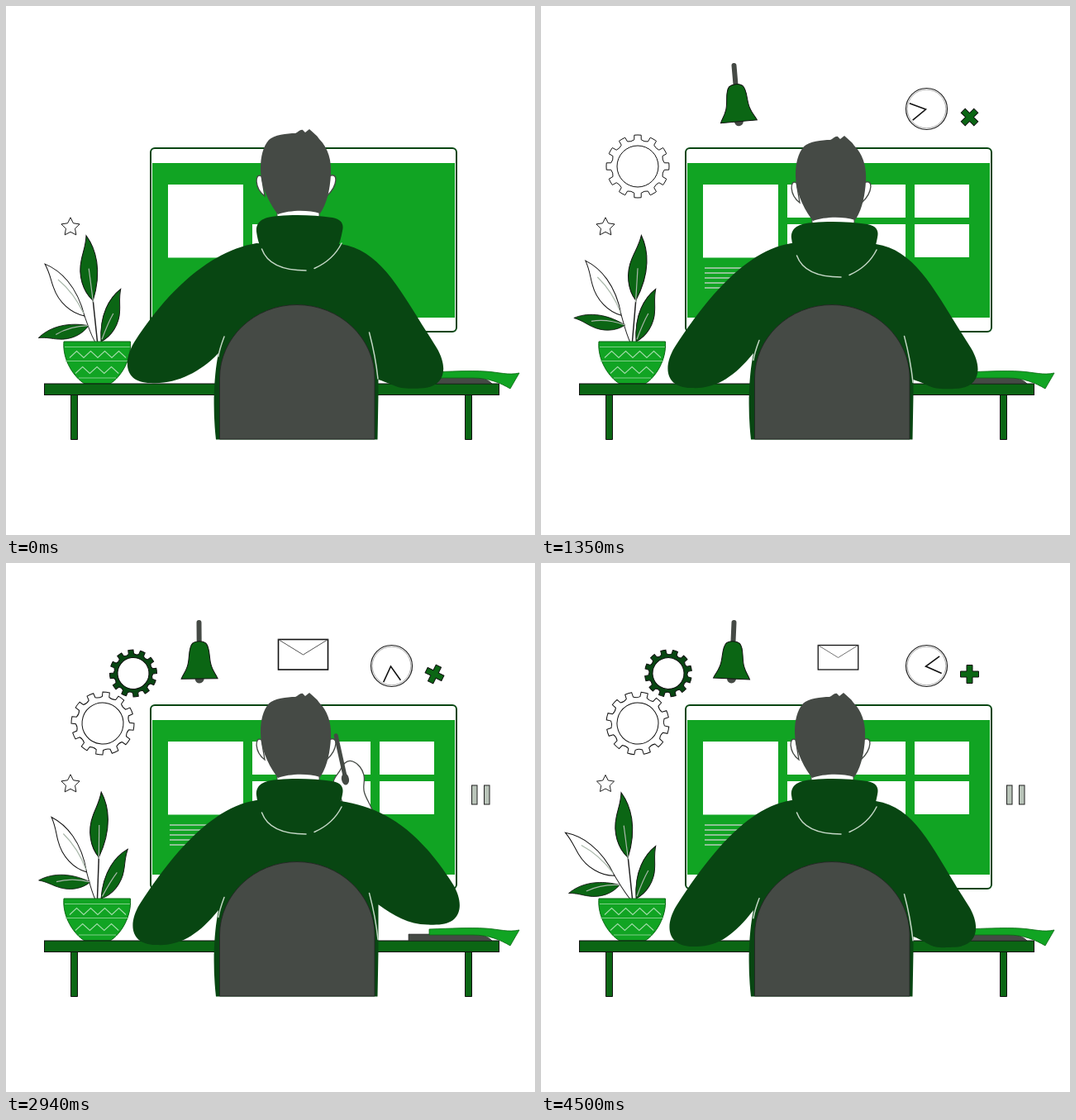
An HTML page for the animation above (4.53 s loop, 640 by 640 pixels).

```html
<!DOCTYPE html>
<html lang="en">
<head>
<meta charset="utf-8">
<title>Working at the desk</title>
<style>
html, body { margin: 0; width: 100%; height: 100%; overflow: hidden; background: #fff; }
svg { display: block; width: 100vw; height: 100vh; }
.green { fill: #11a423; }
.leaf { fill: #0b6614; }
.dark { fill: #084612; }
.grey { fill: #454a45; }
.white { fill: #fff; }
.edge { stroke: #111; stroke-width: 1; }
.bold { stroke: #111; stroke-width: 1.6; }
.line { fill: none; stroke: #c3d6c5; stroke-width: 1.5; stroke-linecap: round; }
.vein { fill: none; stroke: #a9b8aa; stroke-width: 1.2; }
</style>
</head>
<body>
<svg viewBox="0 0 640 640" xmlns="http://www.w3.org/2000/svg">
  <rect x="175" y="172" width="370" height="222" rx="5" fill="#fff" stroke="#084612" stroke-width="2"/>
  <rect class="green" x="177" y="190" width="366" height="187"/>
  <rect class="white" x="196" y="216" width="91" height="88.5"/>
  <g id="panels" class="white"></g>
  <g id="text" stroke="#b9cdbb" stroke-width="1.7"></g>

  <path id="star" class="white edge"/>
  <g id="clock">
    <circle r="25" fill="#fff" stroke="#222" stroke-width="1.2"/>
    <circle r="23.3" fill="none" stroke="#777" stroke-width=".6"/>
    <path id="hands" d="M0 -21V0L-17.8 -10.3" fill="none" stroke="#111" stroke-width="1.6"/>
  </g>
  <path id="cross" class="leaf edge" d="M-3.5 -11H3.5V-3.5H11V3.5H3.5V11H-3.5V3.5H-11V-3.5H-3.5Z"/>
  <g id="bigGear"><path id="bigTeeth" class="white edge"/><circle class="white edge" r="25"/></g>
  <g id="smallGear"><path id="smallTeeth" class="dark edge"/><circle class="white edge" r="19"/></g>
  <g id="bell">
    <path d="M0 0V28" stroke="#454a45" stroke-width="6" stroke-linecap="round"/>
    <circle class="grey" cy="68" r="5.5"/>
    <path class="leaf edge" d="M-8 25C-4 22 4 22 8 25C14 31 11 45 15 54C17 60 20 63 22 68H-22C-20 63 -17 60 -15 54C-11 45 -14 31 -8 25Z"/>
  </g>
  <g id="mail">
    <rect class="white bold" x="-30" y="-36.5" width="60" height="36.5"/>
    <path d="M-30 -36.5L0 -18L30 -36.5" fill="none" stroke="#555"/>
  </g>
  <g id="pause" fill="#b9c4b9" stroke="#222">
    <rect x="-11" y="-11.5" width="6.5" height="23"/>
    <rect x="4" y="-11.5" width="6.5" height="23"/>
  </g>

  <g id="paleLeaf">
    <path d="M95 375C99 386 102 396 108 407" fill="none" stroke="#222"/>
    <path class="blade white edge" transform="translate(95 375) rotate(-37.3)"/>
    <path class="vein" d="M63 331C75 341 86 355 94 372" stroke-width=".8"/>
  </g>
  <g id="tallLeaf">
    <path d="M0 -51V0" fill="none" stroke="#222" stroke-width="1.5"/>
    <path class="blade leaf edge" transform="translate(0 -50)"/>
    <path class="vein" d="M-1 -89L0 -48"/>
  </g>
  <g id="lowLeaf">
    <path class="blade leaf edge" transform="scale(.8 .79)"/>
    <path class="vein" d="M-1 -41C3 -28 3 -14 0 0"/>
  </g>
  <g id="rightLeaf">
    <path class="blade leaf edge" transform="scale(-.9 .86)"/>
    <path class="vein" d="M2 -37C0 -25 0 -14 0 -3"/>
  </g>
  <path class="green" d="M70 406H150.5C152 428 139 449 126 457H95C82 449 68 428 70 406Z" stroke="#0b6614"/>
  <path d="M71 412.5H150M72 429.5H148M88 450H133" fill="none" stroke="#7fcf88"/>
  <path id="zigzag" fill="none" stroke="#a3dcaa" stroke-width="1.1"/>

  <rect class="leaf edge" x="46.5" y="457" width="550" height="13.5"/>
  <path class="leaf edge" d="M78.5 470.5H86.5V524.5H78.5ZM555.5 470.5H563.5V524.5H555.5Z"/>
  <path class="grey" d="M487 449H565C575 449 584 452 588 457H487Z" stroke="#222" stroke-width=".6"/>
  <path class="green" d="M512 443C540 442 560 441 580 442C596 443 608 447 621 444L610 463C598 456 584 450 565 450H512Z" stroke="#0b6614" stroke-width=".8"/>

  <g id="hand">
    <path class="white" stroke="#454a45" stroke-width="1.3" d="M403 271C404 265 410 262 414 257C418 251 424 246 430 249C437 253 441 261 441 269C441 277 437 281 438 289C439 298 443 304 444 314L410 316C412 298 407 280 403 271Z"/>
    <path d="M416 215L418.500 270" stroke="#454a45" stroke-width="5" stroke-linecap="round"/>
    <ellipse class="grey" cx="418" cy="269" rx="4.5" ry="7"/>
  </g>
  <path id="body" class="dark"/>
  <g id="head">
    <path class="white" d="M328 250V270H379V250" stroke="#454a45"/>
    <path class="white" stroke="#454a45" stroke-width="1.3" d="M309 214C301 209 300 228 313 238ZM391 214C402 208 402 225 388 238Z"/>
    <path class="grey" d="M318 170C324 164 340 162 350 162C353 161 356 157 359 158L362 161L367 157C371 161 376 164 379 169C390 180 394 195 393 212C392 230 388 248 380 259C365 254 342 255 329 260C318 246 308 225 308 205C308 190 311 178 318 170Z"/>
  </g>
  <g id="hood">
    <path class="dark" d="M303 281C302 268 312 263 330 262C350 260 375 261 395 264C406 266 409 272 407 280C404 296 400 306 390 314C370 330 335 330 318 315C308 303 305 295 303 281Z"/>
    <path class="line" d="M309.5 302C316 320 335 328 363 328M373 325.5C390 318 400 307 406 295"/>
  </g>
  <path class="grey" d="M258.5 524V450C258.5 402 300 361.5 352 361.5C404 361.5 446 402 446 450V524Z" stroke="#222" stroke-width=".8"/>
  <path id="folds" class="line" d="M264 408C261 416 258 424 257 432M439.5 403C444 420 448 440 450 459"/>
</svg>
<script>
const LOOP = 4530, STEP = 30;
const $ = id => document.getElementById(id);
const move = (id, value) => $(id).setAttribute('transform', value);
const shape = (id, d) => $(id).setAttribute('d', d);
const clamp = v => Math.max(0, Math.min(1, v));
const ease = p => (1 - Math.cos(Math.PI * clamp(p))) / 2;
const mix = (a, b, p) => a + (b - a) * p;
const pop = (t, start, span = 240) => ease((t - start) / span);
const bump = (t, from, to) => Math.sin(Math.PI * clamp((t - from) / (to - from))) ** 2;
const polar = (r, a) => `${(r * Math.sin(a)).toFixed(2)} ${(-r * Math.cos(a)).toFixed(2)}`;

// Eased value at time t from a few alternating times and values
function key(t, ...k) {
  if (t <= k[0]) return k[1];
  for (let i = 2; i < k.length; i += 2)
    if (t <= k[i]) return mix(k[i - 1], k[i + 1], ease((t - k[i - 2]) / (k[i] - k[i - 2])));
  return k[k.length - 1];
}

function gear(n, outer, root) {
  let d = '';
  for (let i = 0; i < n; i++) {
    const w = Math.PI / n, a = 2 * i * w;
    d += (i ? 'L' : 'M') + polar(outer, a - w * .42) + `A${outer} ${outer} 0 0 1 ${polar(outer, a + w * .42)}` +
      `L${polar(root + 1, a + w * .5)}Q${polar(root - 1, a + w)} ${polar(root + 1, a + w * 1.5)}`;
  }
  return d + 'Z';
}

const zigzag = (x, y, step, n) =>
  `M${x} ${y}` + Array.from({ length: n }, (_, i) => `l${step} ${i % 2 ? 8 : -8}`).join('');

function add(parent, tag, attrs) {
  const el = document.createElementNS('http://www.w3.org/2000/svg', tag);
  for (const a in attrs) el.setAttribute(a, attrs[a]);
  return $(parent).appendChild(el);
}

shape('bigTeeth', gear(12, 38, 31.5));
shape('smallTeeth', gear(12, 28.5, 23));
shape('zigzag', zigzag(77, 425.5, 8.5, 8) + zigzag(84, 444.5, 8.7, 6));
shape('star', 'M' + Array.from({ length: 10 }, (_, i) => polar(i % 2 ? 6 : 12, i * Math.PI / 5)).join('L') + 'Z');
document.querySelectorAll('.blade').forEach(p =>
  p.setAttribute('d', 'M0 0C-11 -12 -15 -32 -9 -50C-6 -60 -2 -66 0 -79C10 -62 15 -35 0 0Z'));

// Panels open column by column, the lower one first
const panels = Array.from({ length: 6 }, (_, i) => ({
  x: 331 + (i >> 1) * 77, y: i % 2 ? 236 : 284, start: i * 130 - 200,
  el: add('panels', 'rect', { x: -33, y: -20, width: 66, height: 40 })
}));
const rows = Array.from({ length: 5 }, (_, i) =>
  add('text', 'line', { x1: 198, y1: 317 + i * 6, y2: 317 + i * 6 }));

// Sleeve from the shoulder around the elbow to the armpit; side is -1 or 1
function sleeve(side, [sx, sy], [ex, ey], [px, py]) {
  const at = (x, y) => `${ex + side * x} ${ey + y} `;
  return `L${sx} ${sy}C${sx + side * 50} ${sy + 8} ` + at(-25, -89) + at(20, -19) +
    'C' + at(35, 6) + at(30, 30) + at(0, 30) +
    'C' + at(-30, 32) + `${px + side * 22} ${mix(py, ey + 30, .65)} ${px} ${py}`;
}

function drawBody(t, lift) {
  const lean = key(t, 0, 1, 810, 0, 1350, .45, 3900, .45, 4500, .28);
  const reach = Math.min(7, 14 * lean);
  const elbow = [mix(494 + reach, 525, lift), mix(438 - reach * .8, 402, lift)];
  const right = sleeve(1, [405, 288], elbow, [450.5, mix(452, 405, lift)]);
  const left = sleeve(-1, [303, 287], [187 - 12 * lean, 437 - 11 * lean], [257, 420]);
  shape('body', `M352 290${right}V470L449.500 524.500H352ZM352 290${left}C251 450 250 490 254 524.500H352Z`);

  const bob = 8 * (ease(t / 500) - 1);
  move('head', `translate(${-ease((t - 3900) / 600)} ${bob})`);
  move('hood', `translate(0 ${bob})`);
  move('folds', `translate(0 ${-8 * lean})`);
}

function drawHand(t, lift) {
  const up = key(t, 2150, 0, 2500, 1, 3950, 1, 4300, 0);
  $('hand').style.display = up > .01 ? '' : 'none';
  move('hand', `translate(${-10 * lift} ${-9 * lift + 105 * (1 - up)}) rotate(${-12 * lift} 418 265)`);
}

function drawPlant(t) {
  const pale = key(t, 0, 0, 810, 9, 1350, 4, 3300, 4.8, 4500, -11.6);
  const stem = (pale * 1.3 - 22.8) * Math.PI / 180;
  const droop = key(t, 0, -13.8, 1080, 8, 2550, 6.4, 3780, -13.8, 4500, -9.3);
  move('paleLeaf', `rotate(${pale} 108 406)`);
  move('tallLeaf', `translate(110.5 406) rotate(${-6 * Math.cos(t / 2250 * 2 * Math.PI)})`);
  move('lowLeaf', `translate(${108 + 21 * Math.sin(stem)} ${406 - 21 * Math.cos(stem)}) rotate(${droop - 90})`);
  move('rightLeaf', `translate(115 406) rotate(${20.5 + 6.5 * bump(t, 200, 1350) + 18.5 * bump(t, 2600, 4100)})`);
}

function drawIcons(t) {
  const spin = (t - 1350) * .004;
  const swing = key(t, 1050, 0, 1350, -5, 2550, 6.3, 3300, -6.5, 3780, 5.8, 4500, 2.5);
  const tilt = key(t, 540, 0, 810, 45, 2550, 45, 3300, 10, 3780, 25, 4500, 0);
  move('star', `translate(78 267.5) scale(${.97 - .35 * bump(t, 3000, 4700)})`);
  move('clock', `translate(466.5 124.5) scale(${pop(t, 420)})`);
  move('hands', `translate(-1 .5) rotate(${57.2 + .17263 * t})`);
  move('cross', `translate(518.5 134.5) rotate(${tilt}) scale(${pop(t, 540)})`);
  move('bigGear', `translate(117 194) scale(${pop(t, 900)}) rotate(${spin})`);
  move('smallGear', `translate(154 133.5) scale(${pop(t, 1500)}) rotate(${-spin})`);
  move('bell', `translate(233.5 72) rotate(${swing}) scale(${pop(t, 1050)})`);
  move('mail', `translate(359.5 129) scale(${pop(t, 1800) * (1 - .3 * bump(t, 3300, 5000))})`);
  move('pause', `translate(574.5 280.5) scale(${pop(t, 2150)})`);
}

function draw(t) {
  for (const p of panels)
    p.el.setAttribute('transform', `translate(${p.x} ${p.y}) scale(${pop(t, p.start, 200)})`);
  rows.forEach((row, i) => row.setAttribute('x2', 198 + 89 * clamp((t - 510 - i * 70) / 297)));
  const lift = key(t, 2650, 0, 3050, 1, 3900, 1, 4250, 0);
  drawIcons(t);
  drawPlant(t);
  drawHand(t, lift);
  drawBody(t, lift);
}

let start;
function tick(now) {
  if (start === undefined) start = now;
  draw(Math.floor((now - start) % LOOP / STEP) * STEP);
  requestAnimationFrame(tick);
}
draw(0);
requestAnimationFrame(tick);
</script>
</body>
</html>
```
